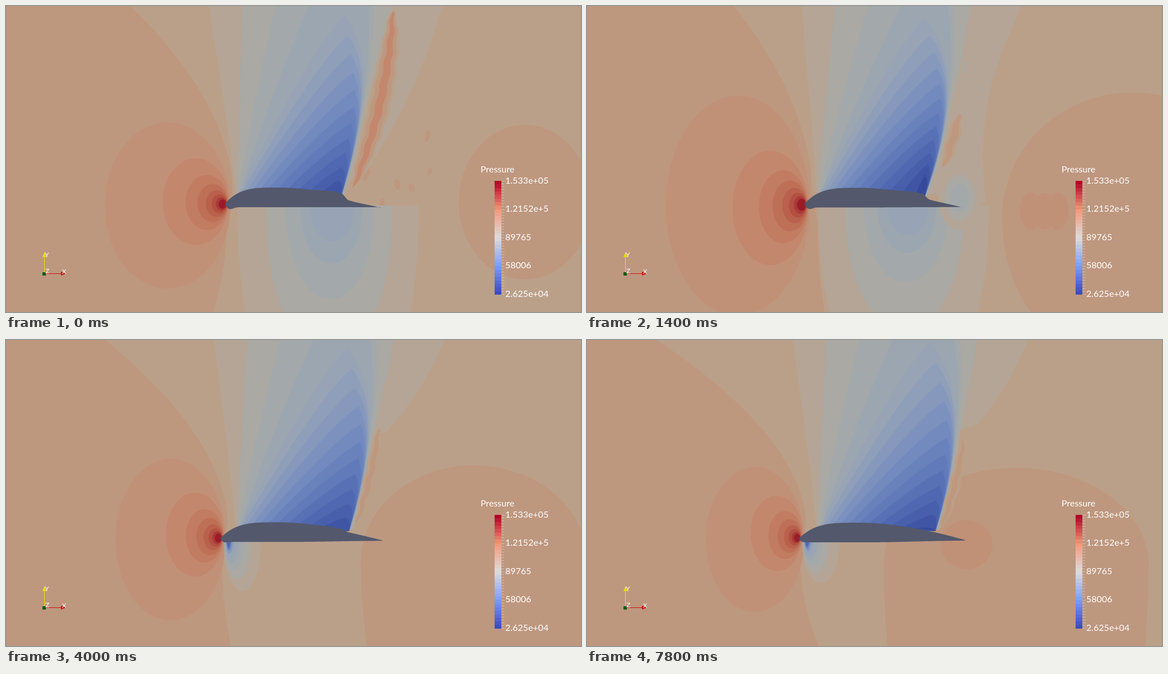
Recreate the animation shown at these times as an HTML page with a canvas. Size 1025x546 px, loop 8 s.

```html
<!DOCTYPE html>
<html lang="en">
<head>
<meta charset="utf-8">
<title>Pressure around an aerofoil</title>
<style>
html, body { margin: 0; width: 100%; height: 100%; overflow: hidden; background: #bba089; }
canvas { display: block; }
</style>
</head>
<body>
<canvas id="stage" width="1025" height="546"></canvas>
<script>
const ctx = document.getElementById('stage').getContext('2d');
const LOOP = 8000, STEP = 200;

const tan = '#bba089', warm = '#be977f';
const reds = ['#c19177', '#c3876d', '#c17c62', '#be7057', '#b9614c', '#b35042', '#a93a37', '#991c28'];
const greys = ['#b5a596', '#aaa9a3', '#a3a9ab', '#9ca6b0'];
const blues = ['#98a4b5', '#8f9eb9', '#8698bb', '#7c91bd', '#728abd', '#6982bc',
  '#617aba', '#5871b5', '#5068b1', '#4860ac', '#4056a4', '#364a9b'];

let time = 0;
const { PI, sin, cos, exp, max, min, sqrt } = Math;
const mix = (a, b, u) => a + (b - a) * u;
const clamp = u => max(0, min(1, u));
const ramp = (from, to, v) => { const u = clamp((v - from) / (to - from)); return u * u * (3 - 2 * u); };
const bell = (mid, spread, v) => exp(-(((v - mid) / spread) ** 2));

// A value that starts at a, surges to b, falls back to c and settles slowly at d.
function phase(a, b, c, d) {
  if (time < 1500) return mix(a, b, time / 1500);
  if (time < 2600) return mix(b, c, (time - 1500) / 1100);
  return mix(d, c, (1 - (time - 2600) / 5200) ** 2);
}

const sample = (fn, n = 24) => Array.from({ length: n + 1 }, (_, i) => fn(i / n));

function fill(points, color) {
  ctx.beginPath();
  points.forEach(([x, y]) => ctx.lineTo(x, y));
  ctx.fillStyle = color;
  ctx.fill();
}

function oval(x, y, rx, ry, color, tilt = 0) {
  if (rx < 1 || ry < 1) return;
  ctx.beginPath();
  ctx.ellipse(x, y, rx, ry, tilt, 0, PI * 2);
  ctx.fillStyle = color;
  ctx.fill();
}

function scatter(seed, count, x, y, w, h, size) {
  const random = () => (seed = seed * 16807 % 2147483647) / 2147483647;
  for (let i = 0; i < count; i++) {
    oval(x + w * random(), y + h * random(), size * (.4 + .5 * random()),
      size * (.6 + random()), warm, random() - .5);
  }
}

const noseX = () => phase(391, 388, 386.5, 378);
const ice = () => (noseX() - 378) / 13;

function shockX(y) {
  const w = (338 - y) / 338;
  return phase(598, 603, 604, 622) + phase(108, 130, 104, 111) * w - phase(64, 95, 66, 83) * w * w;
}

function drawFarField() {
  const top = phase(222, 265, 222, 125), foot = noseX() + 13;
  const waist = phase(394, 412, 389, 380), bottom = phase(368, 428, 390, 415);
  fill([[0, 0],
    ...sample(u => [mix(foot, top, (1 - u) ** 1.85), 330 * u]),
    ...sample(u => [mix(waist, bottom, u * u), 385 + 165 * u]), [0, 550]], warm);

  const cx = phase(925, 975, 895, 765), cy = phase(350, 380, 390, 400);
  const rx = phase(118, 240, 172, 236), above = phase(138, 230, 170, 172), below = phase(138, 280, 320, 640);
  fill(sample(u => {
    const s = sin(u * 2 * PI);
    return [cx + rx * cos(u * 2 * PI), cy + s * (s < 0 ? above : below)];
  }, 90), warm);

  scatter(11, 8, 640, 230, 140, 170, 9 * (1 - ramp(0, 1200, time)));
  scatter(5, 6, 930, 325, 60, 100, 18 * ramp(2600, 4000, time));
  const spot = bell(1700, 600, time);
  for (const i of [-1, 0, 1]) oval(815 + i * 24, 366, 25 * spot, 42 * spot, reds[0]);
}

function drawRings() {
  const nose = noseX(), reach = phase(215, 250, 206, 166);
  const tall = phase(.69, .8, .76, .78), level = phase(349, 361, 349, 345);
  reds.forEach((color, i) => {
    const size = [1, .52][i] || .33 * .7 ** (i - 2);
    const left = nose - reach * size, right = nose + 9 * sqrt(size);
    const y = i ? mix(354, level, min(1, size * 2)) : 356;
    oval((left + right) / 2, y, (right - left) / 2, reach * tall * size, color);
  });
}

// The lower lobes swing with the shed vortices, then shrink to a small jet at the nose.
function drawLower() {
  const swing = cos(2 * PI * time / 1750), shed = ramp(2300, 3800, time), nose = noseX();
  const colors = [...greys, blues[0], blues[2], blues[5], blues[8]];
  colors.forEach((color, i) => {
    const depth = mix((320 + 115 * swing) * .62 ** i, phase(0, 0, 104, 78) * .77 ** i, shed);
    const center = mix(560 + 14 * swing + 2 * i, nose + 13 + 26 * .65 ** i, shed);
    const half = mix((148 + 13 * swing) * .7 ** i, 33 * .72 ** i, shed);
    const drop = i > 4 ? depth * shed : depth;
    fill(sample(u => [center + half * -cos(PI * u), 356 + drop * sin(PI * u) ** .9], 40), color);
  });
}

function drawUpper() {
  const left = phase(362, 384, 374, 367), right = shockX(0) + 1;
  greys.forEach((color, i) => {
    const foot = 409 + 3 * i, off = (3 - i) * 2 + 1, spread = 135 * .3 ** i;
    const tipX = phase(640, 715, 668, 697), tipY = phase(300, 355, 172, 150);
    const bow = phase(14, -32, 10, 8);
    const downwind = i
      ? sample(u => [shockX(338 * u) + off + spread * max(0, 1 - 1.7 * u) ** 1.5, 338 * u])
      : [...sample(u => [mix(right + spread, tipX, u) + bow * sin(PI * u), tipY * u]),
        ...sample(u => { const y = mix(min(tipY + 10, 335), 338, u); return [shockX(y) + off, y]; })];
    fill([...sample(u => [mix(foot, left + 59 * i, u ** 1.15), 338 * (1 - u)]), ...downwind], color);
  });

  const top = phase(18, 22, 25, 4), scale = phase(.98, .86, .99, 1.03);
  blues.forEach((color, i) => {
    const py = top + scale * (36 * i - .62 * i * i), inset = max(39 - 6 * i, 12);
    const px = shockX(py) - inset, foot = 414 + 3.5 * i + 1.1 * i * i;
    fill([
      ...sample(u => [mix(foot, px, u), mix(336, py, 1 - (1 - u) ** 1.2)]),
      ...sample(u => {
        const y = mix(py, 341, u);
        return [shockX(y) - inset * (1 - u) ** 6 - i * .5 * (1 - u), y];
      })], color);
  });
}

function drawShockStrip() {
  const y0 = phase(8, 205, 140, 175), y1 = phase(325, 285, 322, 335);
  const off = phase(17, 16, 9, 9), lean = phase(30, 5, 8, 6), width = phase(15, 6, 5, 5);
  const ribbon = (half, color) => {
    const side = dir => sample(u => {
      const y = mix(y0, y1, u);
      return [shockX(y) + off + lean * (1 - u) + dir * half * sin(PI * u) ** .5 + 1.5 * sin(y * .17), y];
    }, 40);
    fill([...side(-1), ...side(1).reverse()], color);
  };
  ribbon(width + 5, tan);
  ribbon(width, warm);
  if (width > 8) ribbon(width - 8, reds[1]);
}

function drawTail() {
  const puff = bell(1600, 850, time), growth = ramp(5600, 7800, time);
  [[1, 0], [.72, 1], [.45, 2]].forEach(([s, i]) => oval(664, 342, 40 * puff * s, 60 * puff * s, greys[i]));
  const streak = bell(1000, 350, time);
  oval(672, 110, 11 * streak, 48 * streak, greys[1], .12);
  oval(677, 365, 46 * growth, 44 * growth, reds[0]);
}

function drawFoil() {
  const nose = noseX(), rough = ice(), tail = 674 - 7 * rough;
  const notch = x => rough * (8 * ramp(598, 611, x) * (1 - (x - 611) / 140) - 4 * bell(585, 25, x));
  const upper = x => x < 490
    ? 326 - 2 * rough + 28 * ((490 - x) / (490 - nose)) ** 4
    : 326 - 2 * rough + 31 * ((x - 490) / (tail - 490)) ** 1.7 + notch(x);
  const lower = x => 361 - 2 * rough - (3 - 3 * rough) * ramp(500, tail, x)
    - 6 * exp((nose - x) / 3) + 4 * rough * bell(nose + 8, 8, x);
  const along = u => mix(nose, tail, u);
  fill([...sample(u => [along(u), upper(along(u))], 100),
    ...sample(u => [along(1 - u), lower(along(1 - u))], 100)], '#53586c');
}

function coolWarm(u) {
  const stops = [[59, 76, 192], [124, 159, 249], [221, 220, 220], [244, 152, 122], [180, 4, 38]];
  const i = min(3, Math.floor(u * 4));
  return `rgb(${stops[i].map((v, c) => Math.round(mix(v, stops[i + 1][c], u * 4 - i)))})`;
}

function text(str, x, y, size = 16) {
  ctx.font = `${size}px Lato, "Open Sans", sans-serif`;
  ctx.fillStyle = '#fff';
  ctx.fillText(str, x, y);
}

function drawLegend() {
  const top = 312, height = 203, bands = 32;
  for (let i = 0; i < bands; i++) {
    const y = Math.round(top + i * height / bands);
    ctx.fillStyle = coolWarm(1 - i / (bands - 1));
    ctx.fillRect(871, y, 12, Math.round(top + (i + 1) * height / bands) - y);
  }
  ctx.fillStyle = 'rgba(235,228,220,.5)';
  for (let i = 0; i <= 40; i++) ctx.fillRect(883, Math.round(top + i * 5.05), i % 10 ? 5 : 6, 1);
  text('Pressure', 846, 297);
  ['1.533e+05', '1.2152e+5', '89765', '58006', '2.625e+04']
    .forEach((label, i) => text(label, 890, 316.5 + i * 50.6));
}

function drawAxes() {
  ctx.fillStyle = '#e8e000';
  ctx.fillRect(68, 446, 1, 30);
  fill([[68.5, 439], [72, 448], [65, 448]], '#e8e000');
  ctx.fillStyle = '#d01010';
  ctx.fillRect(70, 477, 30, 1);
  fill([[107, 477.5], [98, 474], [98, 481]], '#d01010');
  ctx.fillStyle = '#0b5c14';
  ctx.fillRect(65, 475, 6, 6);
  text('Y', 69, 448, 12);
  text('X', 100, 478, 11);
  text('Z', 70, 477, 12);
}

function draw() {
  ctx.fillStyle = tan;
  ctx.fillRect(0, 0, 1025, 546);
  drawFarField();
  drawRings();
  drawLower();
  drawUpper();
  drawShockStrip();
  drawTail();
  drawFoil();
  drawLegend();
  drawAxes();
}

let shown = -1;
function tick() {
  time = Math.floor(performance.now() % LOOP / STEP) * STEP;
  if (time !== shown) draw();
  shown = time;
  requestAnimationFrame(tick);
}
tick();
</script>
</body>
</html>
```
